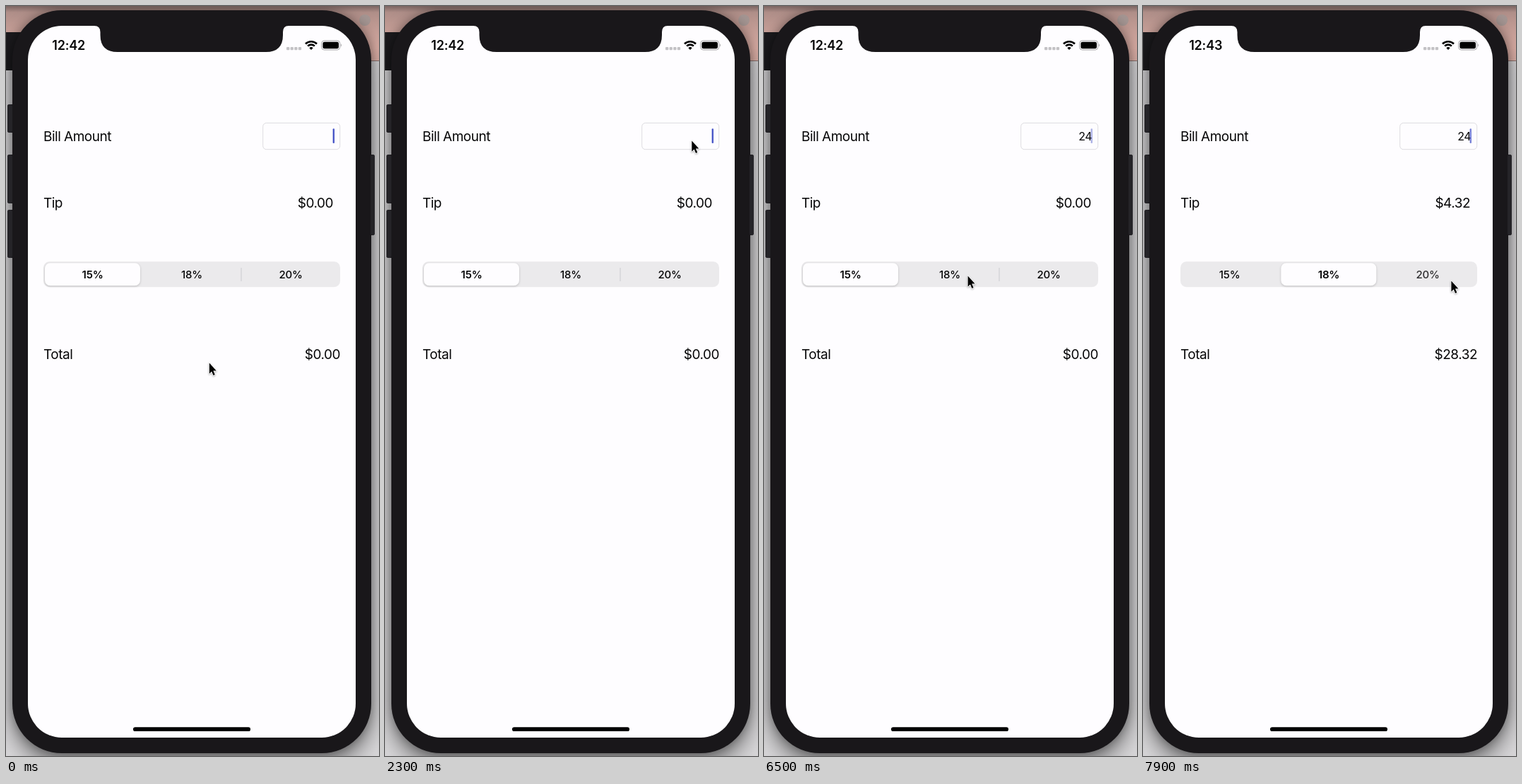
Write an HTML page that moves like this. It is 528 by 1060 pixels and loops after 8000 ms.

```html
<!DOCTYPE html>
<html lang="en">
<head>
<meta charset="utf-8">
<title>Tip calculator</title>
<style>
  html, body { margin: 0; width: 100%; height: 100%; overflow: hidden; background: #d9d8da; }
  #stage { position: relative; width: 528px; height: 1060px; overflow: hidden; background: #d9d8da; }
  #stage > * { position: absolute; }
  .wall { left: 0; top: 0; width: 528px; height: 77px; border-bottom: 1px solid #8e7470;
          background: linear-gradient(#7b6562, #b08f89 9px, #dfb1a8 60px, #e2b4ab); }
  .bar { left: 0; top: 37px; width: 60px; height: 54px; background: #1c1b1e; }
  .logo { left: 500px; top: 12px; width: 16px; height: 16px; border-radius: 50%; background: #a59693; }
  .key { background: #252428; border-radius: 3px; }
  .phone { left: 9px; top: 6px; width: 508px; height: 1050px; border-radius: 70px; background: #19171a;
           box-shadow: 0 14px 32px rgba(0,0,0,.5), 0 0 14px rgba(0,0,0,.28); }
  .screen { left: 31px; top: 28px; width: 464px; height: 1006px; border-radius: 48px; background: #fefdff; }
  svg { left: 0; top: 0; }
  text { font: 400 19px Inter, "Noto Sans", sans-serif; letter-spacing: -.5px; fill: #060607; }
  .end { text-anchor: end; }
  #clock { font-size: 18px; font-weight: 600; letter-spacing: -.2px; text-anchor: middle; }
  #bill { font-size: 16px; letter-spacing: -.6px; }
  #labels text { font-size: 15px; font-weight: 500; letter-spacing: -.2px; text-anchor: middle; }
  #thumb { filter: drop-shadow(0 1.5px 1.5px rgba(0,0,0,.2)); }
  #mouse { filter: drop-shadow(0 1px 1px rgba(0,0,0,.3)); }
</style>
</head>
<body>
<div id="stage">
  <div class="wall"></div>
  <div class="bar"></div>
  <div class="logo"></div>
  <div class="key" style="left:2px;top:139px;width:12px;height:40px"></div>
  <div class="key" style="left:2px;top:210px;width:12px;height:69px"></div>
  <div class="key" style="left:2px;top:288px;width:12px;height:68px"></div>
  <div class="key" style="left:510px;top:210px;width:12px;height:114px"></div>
  <div class="phone"></div>
  <div class="key" style="left:2px;top:139px;width:7px;height:40px"></div>
  <div class="key" style="left:2px;top:210px;width:7px;height:69px"></div>
  <div class="key" style="left:2px;top:288px;width:7px;height:68px"></div>
  <div class="key" style="left:516px;top:210px;width:6px;height:114px"></div>
  <div class="screen"></div>
  <svg width="528" height="1060" viewBox="0 0 528 1060">
    <path fill="#19171a" d="M125 27V28Q133.500 28 133.500 37V41Q133.500 65 158 65H368Q392 65 392 41V37Q392 28 400 28V27Z"/>
    <text id="clock" x="88.700" y="62.200">12:42</text>
    <g fill="#c3c2c5">
      <rect x="397" y="58" width="4.300" height="4.300" rx="1"/>
      <rect x="402.600" y="58" width="4.300" height="4.300" rx="1"/>
      <rect x="408.200" y="58" width="4.300" height="4.300" rx="1"/>
      <rect x="413.800" y="58" width="4.300" height="4.300" rx="1"/>
    </g>
    <g fill="none" stroke="#000" stroke-width="2.600">
      <path d="M424 53.500A11.300 11.300 0 0 1 440 53.500"/>
      <path d="M427.100 56.600A7 7 0 0 1 436.900 56.600"/>
      <path d="M432 62L429.300 59.300A3.800 3.800 0 0 1 434.700 59.300Z" fill="#000" stroke="none"/>
    </g>
    <rect x="446.700" y="49" width="26" height="13" rx="3.800" fill="none" stroke="#a5a4a7"/>
    <rect x="448.400" y="50.700" width="22.600" height="9.600" rx="2.400"/>
    <path d="M474 53.300Q476 55.500 474 57.700Z" fill="#a5a4a7"/>

    <text x="53" y="191.300">Bill Amount</text>
    <rect x="363.700" y="165.300" width="109" height="37.400" rx="5" fill="none" stroke="#dddce0"/>
    <text id="bill" class="end" x="464" y="190"></text>
    <rect id="caret" x="462.600" y="173.300" width="2.400" height="20.800" rx="1" fill="#4a57c8"/>

    <text x="53" y="284.700">Tip</text>
    <text id="tip" class="end" x="463" y="284.700">$0.00</text>

    <rect x="53" y="361.300" width="420" height="35.900" rx="8.500" fill="#ebeaec"/>
    <rect id="divider" x="332.500" y="370" width="1" height="19" fill="#cac9cd"/>
    <rect id="thumb" x="55" y="363.300" width="135" height="32" rx="7.500" fill="#fefdff"/>
    <g id="labels">
      <text x="122.600" y="384.500">15%</text>
      <text x="263" y="384.500">18%</text>
      <text x="403" y="384.500">20%</text>
    </g>

    <text x="53" y="499.200">Total</text>
    <text id="total" class="end" x="473" y="499.200">$0.00</text>

    <rect x="180" y="1019.300" width="166" height="5.700" rx="2.850"/>
    <path id="mouse" d="M0 0V15.200L3.300 12L5.700 17.500L8 16.500L5.600 11H10Z"
          stroke="#fff" stroke-width="1.800" paint-order="stroke" stroke-linejoin="round"/>
  </svg>
</div>
<script>
  const LOOP = 8000, STEP = 100;
  const $ = id => document.getElementById(id);
  const labels = [...$('labels').children];

  // Pointer stops: time, x, y
  const stops = [
    [0, 287.8, 504.5], [700, 432.8, 204], [900, 432.8, 204], [1200, 434.8, 170],
    [1400, 434.3, 190.5], [5300, 434.3, 190.5], [5900, 288.6, 381.5],
    [6950, 288.6, 381.5], [7450, 436.4, 388.5], [8000, 436.4, 388.5]
  ];
  // Caret blinks: fade-out time, fade-in time
  const blinks = [
    [800, 1200], [1800, 2200], [2800, 3200], [4300, 4600],
    [5500, 5900], [6500, 6900], [7500, 7900]
  ];

  const clamp = v => Math.min(1, Math.max(0, v));
  const smooth = p => p * p * (3 - 2 * p);

  function pointer(t) {
    const i = stops.findIndex((s, k) => k && t < s[0]);
    const [t0, x0, y0] = stops[i - 1], [t1, x1, y1] = stops[i];
    const p = smooth((t - t0) / (t1 - t0));
    return [x0 + (x1 - x0) * p, y0 + (y1 - y0) * p];
  }

  function caretAlpha(t) {
    for (const [out, back] of blinks) {
      if (t >= out && t < out + STEP) return .45;
      if (t >= out && t < back) return 0;
      if (t >= back && t < back + STEP) return .75;
    }
    return 1;
  }

  function setText(id, value) {
    const el = $(id);
    if (el.textContent !== value) el.textContent = value;
  }

  function draw(t) {
    const picked = t >= 6800;
    const slide = 1 - (1 - clamp((t - 6700) / 600)) ** 3;

    $('mouse').setAttribute('transform', `translate(${pointer(t)})`);
    $('caret').style.opacity = caretAlpha(t);
    $('thumb').setAttribute('x', 55 + 140.3 * slide);
    $('divider').style.opacity = 1 - slide;

    setText('clock', t < 6600 ? '12:42' : '12:43');
    setText('bill', t < 3700 ? '' : t < 5000 ? '2' : '24');
    setText('tip', picked ? '$4.32' : '$0.00');
    setText('total', picked ? '$28.32' : '$0.00');

    labels.forEach((el, i) => el.style.fontWeight = i === +picked ? 600 : 500);
    labels[1].style.opacity = t >= 6600 && !picked ? .6 : 1;
    labels[2].style.opacity = t >= 7900 ? .82 : 1;
  }

  const start = performance.now();
  function tick() {
    const t = (performance.now() - start) % LOOP;
    draw(Math.floor(t / STEP) * STEP);
    requestAnimationFrame(tick);
  }
  tick();
</script>
</body>
</html>
```
